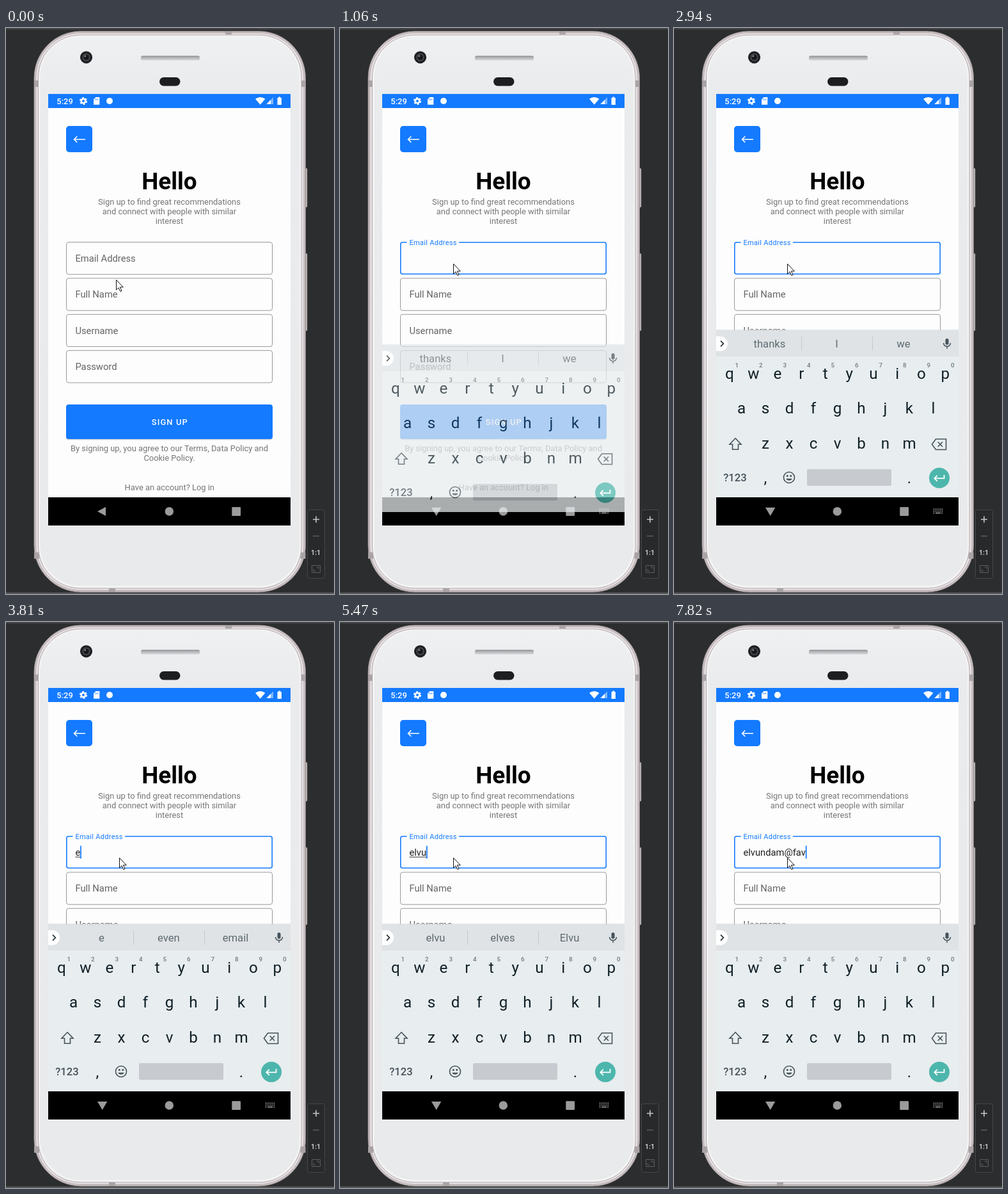
Animation, 513 px wide and 884 px high, one loop 8 s. Source, as an HTML page:

```html
<!DOCTYPE html>
<html lang="en">
<head>
<meta charset="utf-8">
<title>Sign up</title>
<style>
  html, body { margin: 0; width: 100%; height: 100%; overflow: hidden; background: #2b2d2f; }
  svg { display: block; width: 100%; height: 100%; font-family: Roboto, sans-serif; }
  .mid { text-anchor: middle; }
  .note { font-size: 12.92px; fill: #757575; text-anchor: middle; }
  .field { font-size: 14.76px; }
  .key { font-size: 24.2px; fill: #0f1f26; text-anchor: middle; }
  .digit { font-size: 9.8px; font-weight: 500; fill: #717a7e; text-anchor: middle; }
  .word { font-size: 16.6px; fill: #5f6a70; text-anchor: middle; }
  .line { fill: none; stroke-linecap: butt; }
</style>
</head>
<body>
<svg viewBox="0 0 513 884" preserveAspectRatio="none">
  <defs>
    <linearGradient id="face" x2="0" y2="1">
      <stop offset="0" stop-color="#eff0f2"/>
      <stop offset=".1" stop-color="#e9ebed"/>
      <stop offset="1" stop-color="#e8eaeb"/>
    </linearGradient>
    <linearGradient id="speaker" x2="0" y2="1">
      <stop offset="0" stop-color="#85878a"/>
      <stop offset=".4" stop-color="#b5b7ba"/>
      <stop offset="1" stop-color="#d4d5d7"/>
    </linearGradient>
    <clipPath id="screen"><rect x="66" y="103" width="379" height="674"/></clipPath>
  </defs>

  <!-- desktop -->
  <rect width="513" height="884" fill="#2b2d2f"/>
  <rect width="513" height="2.5" fill="#414345"/>
  <rect y="881.5" width="513" height="2.5" fill="#555759"/>

  <!-- phone body -->
  <g id="body">
    <rect x="466" y="219" width="5" height="61" rx="1.5" fill="#c9c2c4" stroke="#807b7d" stroke-width=".8"/>
    <rect x="466" y="352" width="5" height="121" rx="1.5" fill="#c9c2c4" stroke="#807b7d" stroke-width=".8"/>
    <rect x="44" y="5" width="424.5" height="876" rx="73" fill="#cfc6c8" stroke="#8f888a"/>
    <rect x="46.5" y="7.5" width="419.5" height="871" rx="70.5" fill="#e6dfe1" stroke="#a59d9f" stroke-width=".8"/>
    <path d="M44 82h8v10h-8zM460.500 82h8v10h-8zM44 819h8v10h-8zM460.500 819h8v10h-8zM343 5h10v5h-10zM161 875h10v6h-10z" fill="#a9a3a5"/>
    <rect x="50.5" y="11" width="411.5" height="864" rx="66" fill="#f5f4f5" stroke="#aaa4a6" stroke-width=".9"/>
    <rect x="53.5" y="13.5" width="405.5" height="858" rx="63" fill="url(#face)"/>
    <rect x="211" y="43.5" width="92" height="7" rx="2.5" fill="url(#speaker)"/>
    <rect x="240" y="77" width="32.5" height="13.5" rx="6.7" fill="#1d1e20"/>
    <circle cx="125.5" cy="45.8" r="9.6" fill="#222427"/>
    <circle cx="125.5" cy="45.8" r="7" fill="#3f4246" stroke="#101112"/>
    <circle cx="125.5" cy="45.8" r="4" fill="#15171b"/>
    <circle cx="123.8" cy="43.8" r="1.6" fill="#74777d"/>
  </g>

  <!-- emulator zoom panel -->
  <g fill="none" stroke="#5c5e60">
    <rect x="471.5" y="752.5" width="27" height="107" rx="3" fill="#27292b" stroke="#45474a"/>
    <path d="M480 767.5h10M485 762.5v10" stroke="#c6c8ca" stroke-width="1.6"/>
    <path d="M480 793.5h10" stroke-width="1.5"/>
    <path d="M478.5 839.5h13v11h-13zM481 845v3h3M489 845v-3h-3"/>
    <text x="484.5" y="822.7" class="mid" font-size="10.5" font-weight="700" fill="#c6c8ca" stroke="none">1:1</text>
  </g>

  <g clip-path="url(#screen)">
    <rect x="66" y="103" width="379" height="674" fill="#fdfdfd"/>

    <!-- status bar -->
    <rect x="66" y="103" width="379" height="22" fill="#147aff"/>
    <g fill="#fff">
      <text x="79.3" y="118.7" font-size="12.92" font-weight="500">5:29</text>
      <circle cx="121" cy="114" r="3.2" fill="none" stroke="#fff" stroke-width="2.6"/>
      <circle cx="121" cy="114" r="5.1" fill="none" stroke="#fff" stroke-width="2" stroke-dasharray="2.9 2.44"/>
      <path d="M140.500 108H146.300V119.700H137V111.500Z"/>
      <path d="M139.700 110.500v2.200M141.700 110.500v2.200M143.700 110.500v2.200" stroke="#147aff" stroke-width=".9"/>
      <circle cx="162" cy="114" r="5"/>
      <path d="M390 110.800Q397.700 105.200 405.400 110.800L397.700 119.800Z"/>
      <path d="M418 108.300V119H407.300Z" opacity=".45"/>
      <path d="M414 112.300V119H407.300Z"/>
      <path d="M426.300 107.600h2.800v1.300h1.800v11.200h-6.400v-11.200h1.800z"/>
    </g>

    <!-- form -->
    <rect x="94" y="153" width="41" height="41" rx="5" fill="#147aff"/>
    <path d="M124 174H106.500M111.300 169.200L106.500 174L111.300 178.800" class="line" stroke="#fff" stroke-width="1.6"/>
    <text x="255.500" y="252.300" class="mid" font-size="36.9" font-weight="700">Hello</text>
    <text x="255.500" y="276.200" class="note">Sign up to find great recommendations</text>
    <text x="255.500" y="291.300" class="note">and connect with people with similar</text>
    <text x="255.500" y="306.400" class="note">interest</text>
    <g id="fields"></g>
    <rect id="focus" x="94.800" y="334.800" width="321.400" height="49.400" rx="3" fill="none" stroke="#147aff" stroke-width="1.6"/>
    <rect id="notch" y="332" height="5" fill="#fdfdfd"/>
    <text id="label" x="108.400">Email Address</text>
    <text id="typed" x="108.400" y="365" class="field" fill="#1f1f1f"></text>
    <rect id="under" x="108.400" y="366.600" height="1" fill="#333"/>
    <rect id="caret" y="349.500" width="1.7" height="20" fill="#147aff"/>
    <rect x="94" y="589" width="323" height="54.500" rx="4" fill="#000" opacity=".16"/>
    <rect x="94" y="588" width="323" height="54" rx="4" fill="#147aff"/>
    <text x="227.700" y="619.800" font-size="12.92" font-weight="500" letter-spacing="1.15" fill="#fff">SIGN UP</text>
    <text x="255.500" y="661.300" class="note">By signing up, you agree to our Terms, Data Policy and</text>
    <text x="255.500" y="676.300" class="note">Cookie Policy.</text>
    <text x="255.800" y="722" class="note">Have an account? Log in</text>

    <!-- navigation bar -->
    <rect x="66" y="733" width="379" height="44" fill="#000"/>
    <g fill="#9b9b9b">
      <path id="back" d="M143 755L156 748V762Z"/>
      <circle cx="255.300" cy="755" r="6.700"/>
      <rect x="353.300" y="748.300" width="13.700" height="13.700" rx="1"/>
      <g id="down">
        <path d="M143 749H158.300L150.700 762Z"/>
        <path d="M405.500 751.500h15M405.500 754.500h15M405.500 757.500h2.500M418 757.500h2.500" class="line" stroke="#9b9b9b" stroke-width="1.700" stroke-dasharray="2 1.200"/>
        <path d="M409 757.500h8" class="line" stroke="#9b9b9b" stroke-width="1.700"/>
      </g>
    </g>

    <!-- soft keyboard -->
    <g id="board">
      <rect x="66" y="471" width="379" height="2" fill="#d9dcde" opacity=".7"/>
      <rect x="66" y="473" width="379" height="260" fill="#e8edef"/>
      <rect x="66" y="473" width="379" height="40" fill="#dfe3e6"/>
      <path d="M66 481.500h6.500a11.500 11.500 0 0 1 0 23H66z" fill="#fff"/>
      <path d="M73 488.700L77.300 493L73 497.300" class="line" stroke="#222e34" stroke-width="1.700"/>
      <path id="bars" d="M199.500 482v22M310.500 482v22" class="line" stroke="#c3c8cb"/>
      <g id="words"></g>
      <rect x="424.500" y="485" width="5" height="9.800" rx="2.500" fill="#46535a"/>
      <path d="M421.500 492a5.500 5.500 0 0 0 11 0M427 497.500v3.500" class="line" stroke="#46535a" stroke-width="1.500"/>
      <g id="keys"></g>
      <g class="line" stroke="#46535a" stroke-width="1.600">
        <path d="M96 640.800L105 650.300H100.500V658.300H91.500V650.300H87Z"/>
        <path d="M409.500 642H425.500V658.500H409.500L403.500 650.200Z"/>
        <path d="M412.700 646.500L420 654M420 646.500L412.700 654"/>
        <circle cx="180" cy="702" r="8.500"/>
      </g>
      <path d="M176 698.300h2.600v2.600h-2.600zM181.400 698.300h2.600v2.600h-2.600zM175.300 703.800h9.400a4.900 4.200 0 0 1 -9.400 0z" fill="#46535a"/>
      <text x="77.300" y="708" font-size="16.600" font-weight="500" fill="#46535a">?123</text>
      <text x="143" y="710.500" class="key">,</text>
      <text x="368" y="710.500" class="key">.</text>
      <rect x="208" y="689" width="132" height="26" rx="2" fill="#c7cbcf"/>
      <circle cx="415" cy="702.700" r="16" fill="#4db6ac"/>
      <path d="M422.500 698V703.300H407.500M411.800 698.800L407.300 703.300L411.800 707.800" class="line" stroke="#fff" stroke-width="1.800"/>
    </g>
  </g>

  <path id="mouse" d="M.5 .5V16L4 12.700L6.800 18.500L9 17.500L6.400 11.800H11.300Z" fill="#fff" stroke="#111"/>
</svg>

<script>
const LOOP = 8000;
const BLUE = '#147aff';
const NAME = 'elvundam';
const $ = id => document.getElementById(id);
const lerp = (a, b, p) => a + (b - a) * p;

function add(parent, tag, attrs, text = '') {
  const el = document.createElementNS('http://www.w3.org/2000/svg', tag);
  set(el, attrs);
  el.textContent = text;
  return parent.appendChild(el);
}
function set(el, attrs) {
  for (const k in attrs) el.setAttribute(k, attrs[k]);
}
const show = (el, on) => set(el, { visibility: on ? 'visible' : 'hidden' });

const boxes = ['', 'Full Name', 'Username', 'Password'].map((name, i) => {
  const y = 334.5 + i * 56.4;
  add($('fields'), 'text', { x: 108.4, y: y + 30.4, class: 'field', fill: '#646464' }, name);
  return add($('fields'), 'rect', { x: 94.5, y, width: 322, height: 50.3, rx: 3.5, fill: 'none', stroke: '#999' });
});

['qwertyuiop', 'asdfghjkl', 'zxcvbnm'].forEach((row, r) => {
  [...row].forEach((ch, i) => {
    const x = [86.8, 105.5, 143][r] + i * 37.5;
    add($('keys'), 'text', { x, y: 547.8 + r * 54.4, class: 'key' }, ch);
    if (!r) add($('keys'), 'text', { x: x + 11.4, y: 530, class: 'digit' }, (i + 1) % 10);
  });
});

const words = [149.4, 254.4, 359].map(x => add($('words'), 'text', { x, y: 499.2, class: 'word' }));

// Each cue overrides part of the state from its time on.
const cues = [
  [0, { mouse: [172, 393], float: 0, focus: false, caret: false, nav: false, board: 0, lift: 23,
        text: '', under: true, bars: true, bold: false, words: ['thanks', 'I', 'we'] }],
  [120, { mouse: [177, 368] }],
  [420, { focus: true, float: .35, caret: true }],
  [540, { float: .92 }],
  [660, { float: 1 }],
  [940, { caret: false, nav: true }],
  [1060, { board: .73 }],
  [1210, { board: 1, lift: 0 }],
  [1360, { caret: true }],
  [1820, { caret: false }],
  [2320, { caret: true }],
  [2940, { caret: false }],
  [3310, { caret: true }],
  [3430, { text: 'e' }],
  [3810, { words: ['e', 'even', 'email'] }],
  [3930, { caret: false }],
  [4490, { caret: true }],
  [4630, { text: 'el', words: ['el', 'else', 'El'], bold: true }],
  [4880, { text: 'elv' }],
  [5000, { words: ['elv', 'elves', 'elevation'] }],
  [5470, { text: 'elvu', words: ['elvu', 'elves', 'Elvu'], bold: false }],
  [5750, { text: 'elvund' }],
  [5870, { text: 'elvunda', words: ['elvunda', '', ''] }],
  [6120, { text: NAME, words: ['', NAME, ''], bars: false }],
  [6660, { caret: false }],
  [7050, { text: NAME + '@', under: false, words: ['', '', ''], caret: true }],
  [7420, { text: NAME + '@f' }],
  [7700, { text: NAME + '@fa' }],
  [7820, { text: NAME + '@fav' }],
];

function render(t) {
  const s = Object.assign({}, ...cues.filter(c => c[0] <= t).map(c => c[1]));
  const p = s.float;

  set($('mouse'), { transform: `translate(${s.mouse})` });
  show($('focus'), s.focus);
  show(boxes[0], !s.focus);
  set($('notch'), { x: lerp(145, 104.5, p), width: 81.5 * p });
  set($('label'), {
    y: lerp(364.9, 339.1, p), 'font-size': lerp(14.76, 11.07, p),
    'letter-spacing': .28 * p, fill: s.focus ? BLUE : '#646464',
  });

  $('typed').textContent = s.text;
  const width = s.text ? $('typed').getComputedTextLength() : 0;
  set($('under'), { width: s.under ? width : 0 });
  set($('caret'), { x: 108.3 + width });
  show($('caret'), s.caret);

  show($('back'), !s.nav);
  show($('down'), s.nav);
  set($('board'), { opacity: s.board, transform: `translate(0 ${s.lift})` });
  show($('bars'), s.bars);
  words.forEach((w, i) => {
    w.textContent = s.words[i];
    const strong = s.bold && i === 1;
    w.style.fontWeight = strong ? 700 : 400;
    w.style.fill = strong ? '#111' : '';
  });
}

const start = performance.now();
function tick() {
  render((performance.now() - start) % LOOP);
  requestAnimationFrame(tick);
}
tick();
</script>
</body>
</html>
```
